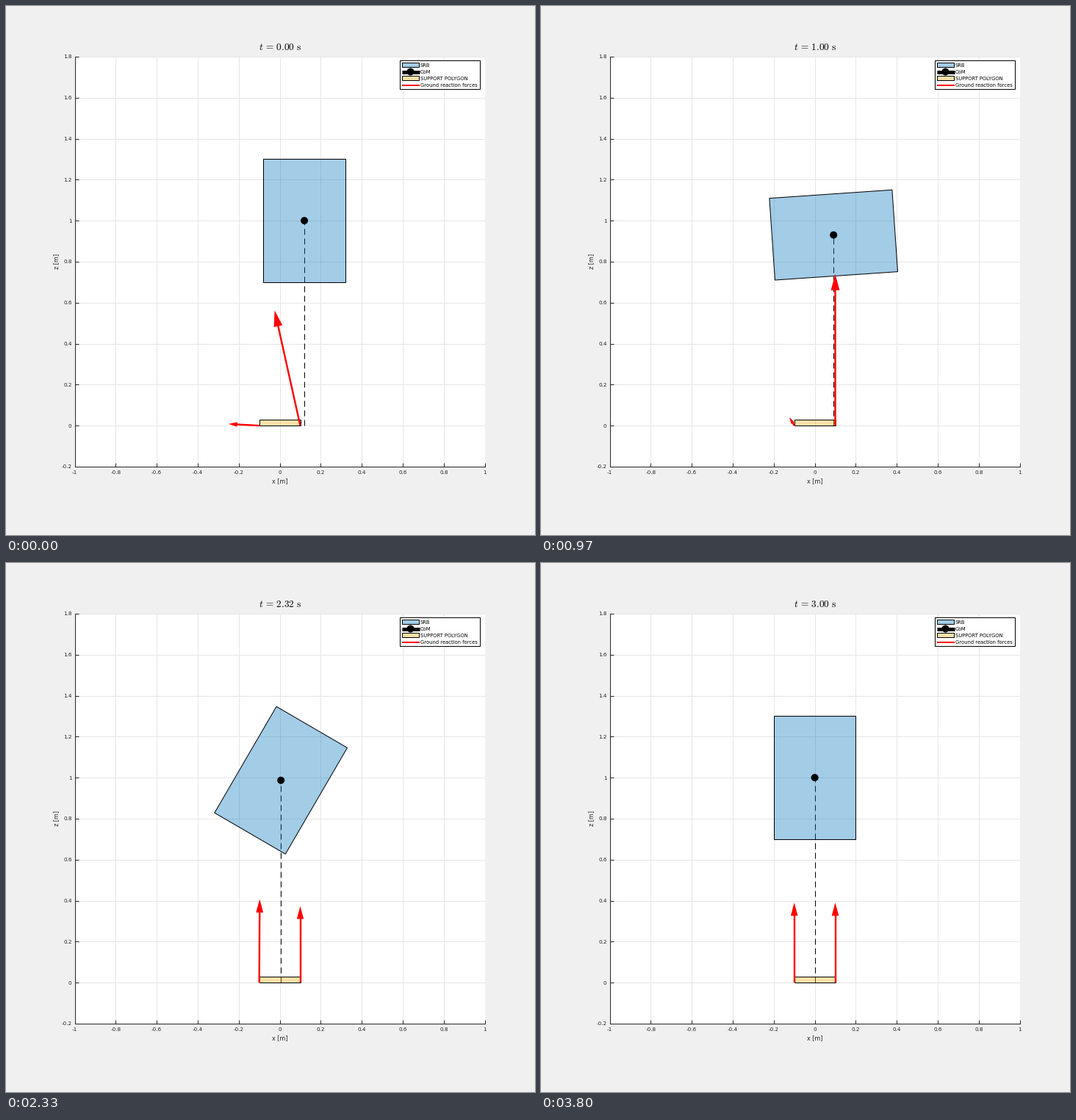
These frames come from a looping animation (720 by 720 pixels, 4.03 s). A matplotlib script:

```python
import numpy as np
import matplotlib.pyplot as plt
from matplotlib.animation import FuncAnimation
from matplotlib.patches import Circle, Polygon, Rectangle

SIZE, LOOP, FRAMES = 720, 4030, 155
STEP = LOOP // FRAMES
LEFT, TOP, SPAN = 93.6, 68.9, 558
SCALE = SPAN / 2  # pixels per metre
DT, END = 0.04, 3.0
FOOT = 0.1  # half width of the support

INK = "#262626"
PAPER = "#f0f0f0"
PLOT = "#ffffff"
GRID = "#e6e6e6"
BLUE = (0, 0.447, 0.741, 0.36)
SAND = (0.96, 0.70, 0.10, 0.38)
RED = "#ff0000"

plt.rcParams.update({
    "font.family": "DejaVu Sans",
    "mathtext.fontset": "cm",
    "axes.unicode_minus": False,
    "toolbar": "None",
})


def logistic(u):
    return 1 / (1 + np.exp(-u))


def sim_time(frame):
    """The simulation advances in whole steps and then holds."""
    return min(END, DT * round(0.4 + 0.65273 * frame))


def pose(t):
    """Centre of mass and clockwise pitch in degrees."""
    if t >= END:
        return 0, 1, 0
    # Quick swing onto a steady ramp back to upright
    pitch = max(0, 46.5 * (2.97 - t)) * (1 - np.exp(-2.81 * t ** 1.12))
    x = 0.025 * np.exp(-10 * t) + 0.095 * logistic(4.6 * (1.72 - t))
    z = 1 - 0.07 * (pitch / 86) ** 1.6
    return x, z, pitch


def forces(t):
    """Left and right ground forces; the load shifts to the left foot."""
    if t >= END:
        return np.array([(0, 0.39), (0, 0.39)])
    d = t - 2.3
    share = 0.01 + logistic(2.4 * d + 3.5 * max(d, 0) ** 3)
    total = 0.78 - 0.21 * np.exp(-8 * t)
    swing = np.cos(6.6 * t)
    return np.array([(-0.15 * np.exp(-1.8 * t) * swing, share * total),
                     (-0.125 * np.exp(-8 * t) * swing, (1 - share) * total)])


class Arrow:
    def __init__(self, ax, x):
        self.tail = np.array([x, 0.0])
        self.shaft, = ax.plot([], [], color=RED, lw=2.4, zorder=6,
                              solid_capstyle="butt")
        self.head = Polygon(np.zeros((3, 2)), fc=RED, ec="none", zorder=6)
        ax.add_patch(self.head)

    def set(self, force):
        length = np.hypot(*force)
        d = force / length
        n = np.array([-d[1], d[0]])
        size = min(22, 8 + 0.09 * length * SCALE) / SCALE
        tip = self.tail + force
        base = tip - size * d
        end = tip - min(size, length) * 0.8 * d
        self.shaft.set_data(*zip(self.tail, end))
        self.head.set_xy([tip, base + 0.27 * size * n, base - 0.27 * size * n])


fig = plt.figure(figsize=(SIZE / 72, SIZE / 72), dpi=72, facecolor=PAPER)
ax = fig.add_axes([LEFT / SIZE, 1 - (TOP + SPAN) / SIZE,
                   SPAN / SIZE, SPAN / SIZE], facecolor=PLOT)
ax.set(xlim=(-1, 1), ylim=(-0.2, 1.8))
ax.set_axisbelow(True)
ax.grid(color=GRID, lw=1)
ax.spines[["top", "right"]].set_visible(False)
ax.spines[["left", "bottom"]].set(color=INK, linewidth=1)
ticks = np.arange(-5, 10) / 5
ax.set_xticks(ticks[:11], [f"{v:g}" for v in ticks[:11]])
ax.set_yticks(ticks[4:], [f"{v:g}" for v in ticks[4:]])
ax.tick_params(direction="in", length=5, width=1, color=INK,
               labelcolor=INK, labelsize=7.2, pad=4)
ax.tick_params(axis="x", pad=5)

# Pixel overlay for labels and legend
over = fig.add_axes([0, 0, 1, 1])
over.set(xlim=(0, SIZE), ylim=(SIZE, 0))
over.axis("off")


def label(x, y, text, size, color=INK, **kw):
    kw = {"ha": "center", "va": "center_baseline", **kw}
    return over.text(x, y, text, fontsize=size, color=color, **kw)


def box(x, y, w, h, color):
    over.add_patch(Rectangle((x, y), w, h, fc=color, ec="black", lw=1,
                             snap=False))


def bar(y, color, width):
    over.plot([539, 563], [y, y], color=color, lw=width,
              solid_capstyle="butt")


label(373, 645.5, "x [m]", 8)
label(68.5, 347.5, "z [m]", 8, rotation=90, va="center")
title = label(372.6, 60, "", 13.3, "black", va="baseline")

box(536.5, 74.5, 109, 39, PLOT)
box(539.5, 77.5, 23, 6, BLUE)
box(539.5, 95.5, 23, 6, SAND)
bar(89.5, "black", 5)
bar(108, RED, 2)
over.add_patch(Circle((550.5, 89.5), 5, color="black", lw=0))
names = ["SRB", "CoM", "SUPPORT POLYGON", "Ground reaction forces"]
for row, name in enumerate(names):
    label(564, 82.8 + 9.2 * row, name, 6.8, "black", ha="left", va="baseline")

# Moving parts; the drop line shows through the translucent shapes
corners = np.array([(-0.2, 0.3), (0.2, 0.3), (0.2, -0.3), (-0.2, -0.3)])
body = Polygon(corners, fc=BLUE, ec="black", lw=1, zorder=3)
ax.add_patch(body)
ax.add_patch(Rectangle((-FOOT, 0), 2 * FOOT, 0.03, fc=SAND, ec="black",
                       lw=1, zorder=3))
drop, = ax.plot([], [], color="black", lw=1, zorder=2.8,
                dashes=(8, 5), dash_capstyle="butt")
com = Circle((0, 0), 5 / SCALE, color="black", lw=0, zorder=5)
ax.add_patch(com)
arrows = [Arrow(ax, -FOOT), Arrow(ax, FOOT)]


def update(frame):
    t = sim_time(frame)
    x, z, pitch = pose(t)
    c, s = np.cos(np.radians(pitch)), np.sin(np.radians(pitch))
    body.set_xy(corners @ np.array([[c, -s], [s, c]]) + (x, z))
    com.center = x, z
    drop.set_data([x, x], [0, z])
    for arrow, force in zip(arrows, forces(t)):
        arrow.set(force)
    title.set_text(rf"$t\,=\,{t:.2f}\ \mathrm{{s}}$")
    return []


anim = FuncAnimation(fig, update, frames=FRAMES, interval=STEP,
                     init_func=lambda: [], repeat=True, repeat_delay=0)
plt.show()
```
